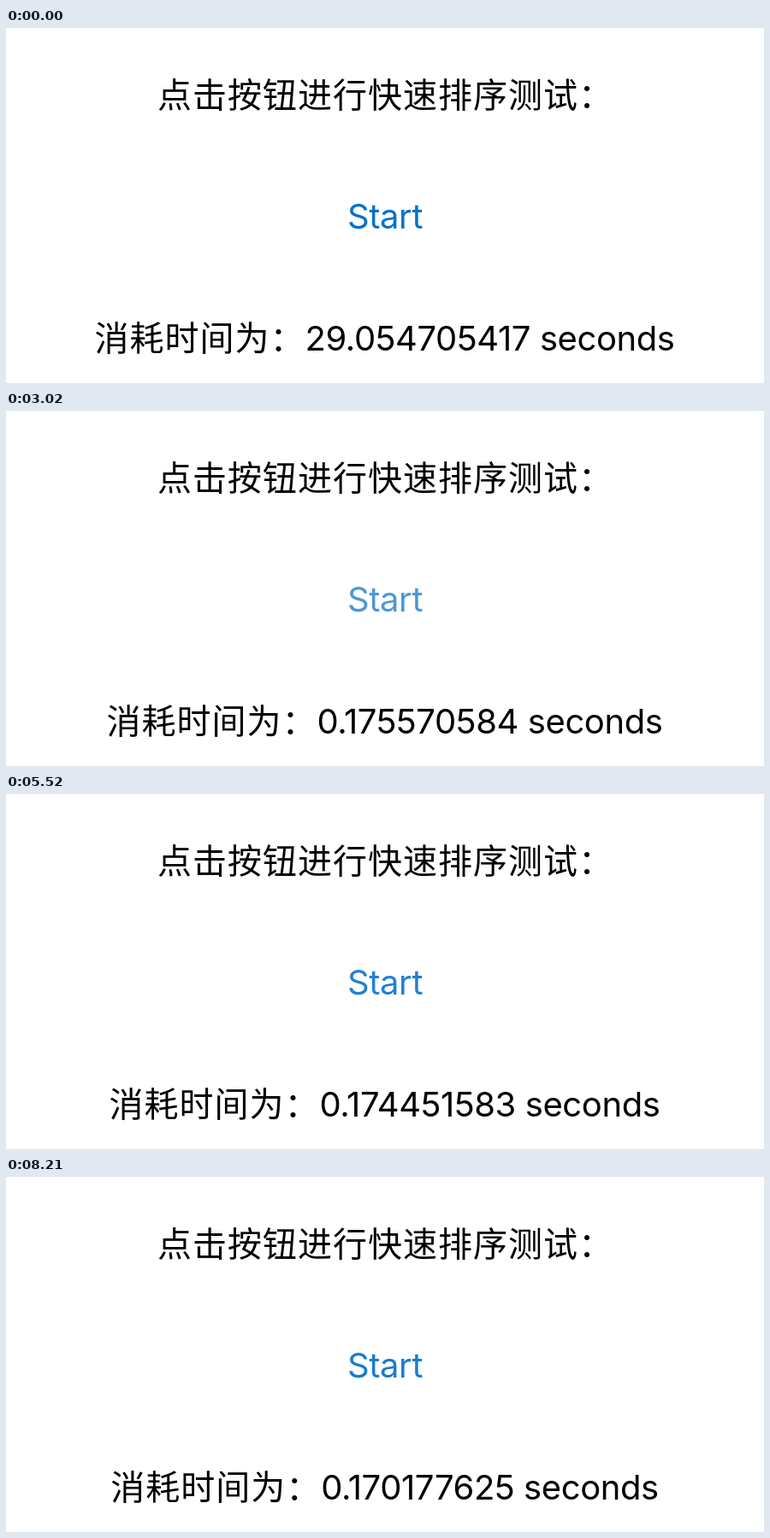
These frames come from a looping animation (886x416 px, 8.31 s). An HTML page:

```html
<!DOCTYPE html>
<html lang="zh-CN">
<head>
<meta charset="utf-8">
<style>
  html, body { margin: 0; width: 100%; height: 100%; overflow: hidden; background: #fff; }
  svg { display: block; }
  text { font: 40px Inter, "Noto Sans CJK SC", sans-serif; letter-spacing: -.4px; text-anchor: middle; }
  .han { font-family: "Noto Sans CJK SC", "Noto Sans CJK", sans-serif; letter-spacing: 1px; }
</style>
</head>
<body>
<svg width="886" height="416" viewBox="0 0 886 416">
  <text class="han" x="443.5" y="92.5">点击按钮进行快速排序测试：</text>
  <text id="start" x="443" y="235" fill="#0670cc">Start</text>
  <text x="442.5" y="377.5"><tspan class="han">消耗时间为：</tspan><tspan id="result"></tspan></text>
</svg>
<script>
const LOOP = 8310, PRESS = 80, HOLD = 250, FADE = 700, DIM = 0.7;
const start = document.getElementById('start');
const result = document.getElementById('result');

// Each tap: time the result appears, measured seconds
const taps = [
  [1150, '0.178304959'],
  [2540, '0.175570584'],
  [3790, '0.178168917'],
  [4920, '0.174451583'],
  [6050, '0.169171208'],
  [7585, '0.170177625'],
];

const clamp = v => Math.min(1, Math.max(0, v));
const smooth = v => v * v * (3 - 2 * v);

// How far the button is dimmed, relative to the result time
function dimming(dt) {
  const down = clamp((dt + HOLD + PRESS) / PRESS);
  const up = smooth(clamp((dt - 80) / FADE));
  return DIM * down * (1 - up);
}

function draw(now) {
  const t = now % LOOP;
  let value = '29.054705417', dim = 0;
  for (const [time, seconds] of taps) {
    if (t >= time) value = seconds;
    dim = Math.max(dim, dimming(t - time));
  }
  const label = value + ' seconds';
  if (result.textContent !== label) result.textContent = label;
  start.setAttribute('opacity', 1 - dim);
  requestAnimationFrame(draw);
}

draw(0);
</script>
</body>
</html>
```
